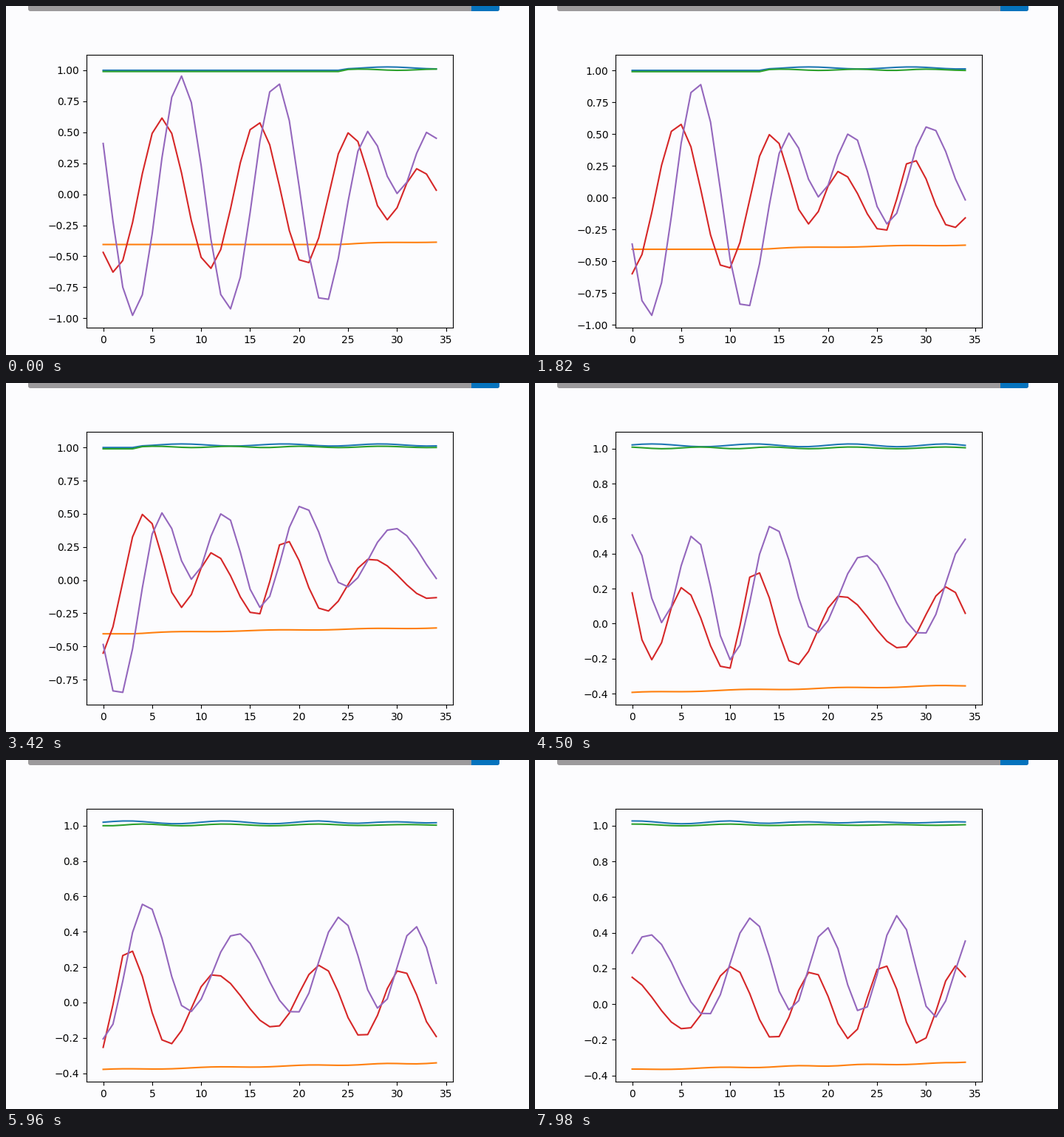
A matplotlib script for the animation above (8 s loop, 708 by 472 pixels).

```python
import numpy as np
import matplotlib.pyplot as plt
from matplotlib.animation import FuncAnimation
from matplotlib.patches import FancyBboxPatch, Rectangle

W, H, DPI = 708, 472, 100
LOOP, STEP = 8000, 40
WINDOW, SAMPLES = 35, 84
SPLIT = 25                      # samples before the free swing is disturbed
RATE, LEAD = 0.00619, 0.14      # samples scrolled per ms, and head start
PAPER = "#fcfcfe"
T = np.arange(SAMPLES)


def swing(amp, decay, omega, trough):
    """Free, slowly fading oscillation."""
    return -amp * np.exp(-decay * T) * np.cos(omega * (T - trough))


def wave(times, values):
    """Cosine easing from one turning point to the next."""
    times, values = np.array(times), np.array(values)
    i = np.clip(np.searchsorted(times, T, side="right") - 1, 0, len(times) - 2)
    u = (T - times[i]) / (times[i + 1] - times[i])
    return values[i] + np.diff(values)[i] * (1 - np.cos(np.pi * u)) / 2


def ripple(*crests):
    """Unit oscillation with its crests at the given samples."""
    return np.cos(2 * np.pi * np.interp(T, crests, range(len(crests))))


def switch(before, after):
    return np.where(T < SPLIT, before, after)


fade = np.interp(T, [59, 66], [1, 0.4])
beat = ripple(19, 29, 39.5, 49.3, 59, 66.8, 73.5, 82, 90)
sway = ripple(19, 26.3, 34, 41, 49.3, 59, 68, 76, 84)
settle = np.exp(-np.maximum(T - 24, 0) / 3)

blue = switch(1.0, 1.019 + 0.008 * fade * beat)
orange = switch(-0.405, -0.389 + 0.00112 * (T - 29) - 0.01 * settle
                + 0.003 * np.roll(beat, -1))
green = switch(0.99, 1.0045 + 0.005 * fade * sway)
red = switch(
    swing(0.634, 0.00514, 0.6457, 1.145),
    wave([25.2, 29, 32.1, 36.7, 39.5, 43.6, 48.3, 54.5,
          59.2, 63.5, 67.4, 71.2, 74.6, 78.3, 82.1, 85.7],
         [.5, -.206, .207, -.27, .31, -.24, .16, -.142,
          .212, -.197, .188, -.195, .226, -.225, .215, -.2]))
purple = switch(
    swing(0.993, 0.005, 0.646, 3.09),
    wave([22.5, 27, 30.1, 33.3, 37.1, 41.3, 45.7, 50.6,
          56.6, 61.2, 65.2, 68.8, 72.4, 76.1, 79.8, 84],
         [-.86, .507, .005, .51, -.207, .565, -.055, .393,
          -.063, .485, -.035, .432, -.05, .497, -.075, .42]))

data = np.array([blue, orange, green, red, purple])

fig = plt.figure(figsize=(W / DPI, H / DPI), dpi=DPI, facecolor=PAPER)

# Header strip, cut off by the top edge
stage = fig.add_axes([0, 0, 1, 1], xlim=(0, W), ylim=(H, 0))
stage.axis("off")
strip = FancyBboxPatch((30, -20), 638, 27, lw=0, fc="#9c9a9c",
                       boxstyle="round,pad=0,rounding_size=3")
stage.add_patch(strip)
button = stage.add_patch(Rectangle((630, -20), 38, 27, lw=0, fc="#0573bd"))
button.set_clip_path(strip)

ax = fig.add_axes([109 / W, 36.8 / H, 496 / W, 369.6 / H], facecolor=PAPER)
lines = ax.plot(T[:WINDOW], data[:, :WINDOW].T, lw=1.5)
ax.set_xlim(-1.7, 35.7)


def draw(frame):
    start = int(RATE * frame * STEP + LEAD)
    view = data[:, start:start + WINDOW]
    for line, row in zip(lines, view):
        line.set_ydata(row)
    low, high = view.min(), view.max()
    pad = 0.05 * (high - low)
    ax.set_ylim(low - pad, high + pad)
    return lines


anim = FuncAnimation(fig, draw, frames=LOOP // STEP, interval=STEP,
                     repeat=True, repeat_delay=0, blit=False)
plt.show()
```
